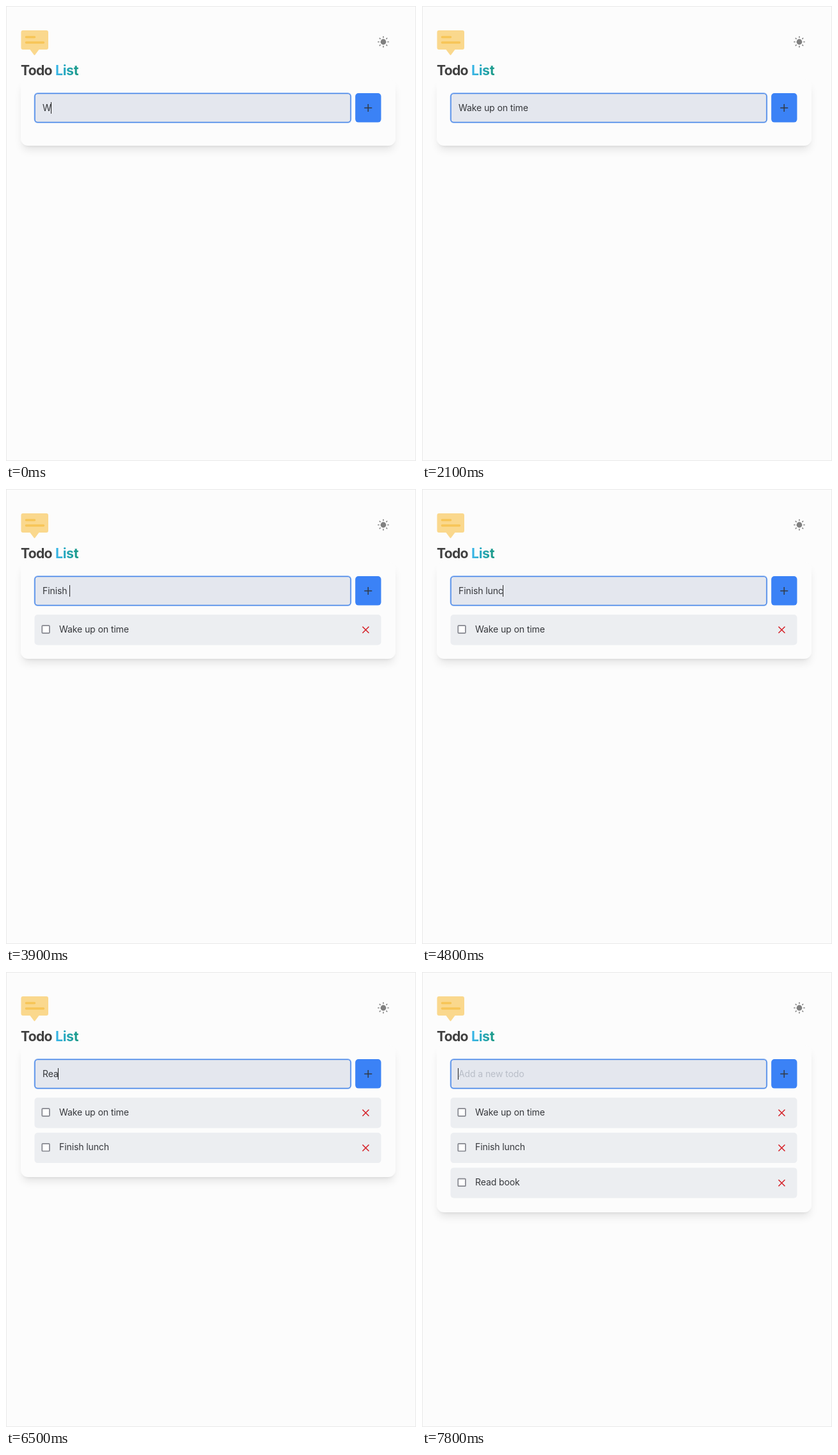
An HTML page that plays this animation: 640x710 px, repeating every 8000 ms.

```html
<!DOCTYPE html>
<html lang="en">
<head>
<meta charset="utf-8">
<title>Todo List</title>
<style>
  html, body { margin: 0; width: 100%; height: 100%; overflow: hidden; background: #fcfcfc; }
  #card {
    position: absolute; left: 23px; top: 114px; width: 584.5px;
    border-radius: 11px; background: #fcfcfc;
    box-shadow: 0 9px 14px -3px rgb(0 0 0 / .1), 0 4px 5px -4px rgb(0 0 0 / .1);
  }
  svg { position: absolute; left: 0; top: 0; }
  text { font: 14px Inter, sans-serif; letter-spacing: -.1px; white-space: pre; fill: #36383c; }
  .title { font-size: 21.2px; font-weight: 700; }
</style>
</head>
<body>
<div id="card"></div>
<svg width="640" height="710" viewBox="0 0 640 710" fill="none">
  <defs>
    <linearGradient id="listColor" gradientUnits="userSpaceOnUse" x1="78" x2="116" y1="0" y2="0">
      <stop stop-color="#38b6ea"/>
      <stop offset="1" stop-color="#14957a"/>
    </linearGradient>
  </defs>
  <rect x=".5" y=".5" width="639" height="709" stroke="#e9e9e9"/>

  <path d="M26.5 38h36.5a3 3 0 0 1 3 3v24a3 3 0 0 1-3 3h-11.5l-6 8q-1 1.3-2 0l-6-8h-11a3 3 0 0 1-3-3v-24a3 3 0 0 1 3-3z" fill="#fad88d"/>
  <path d="M31.5 48.6h13M31.5 57h27" stroke="#f7c557" stroke-width="3.5" stroke-linecap="round"/>

  <text class="title" x="23" y="108" style="letter-spacing:-.8px;fill:#404040">Todo</text>
  <text class="title" x="77" y="108" style="letter-spacing:-.3px;fill:url(#listColor)">List</text>

  <g id="sun" stroke="#808080" stroke-width="1.6" stroke-linecap="round" transform="translate(589 56)">
    <circle r="4.4" fill="#808080" stroke="none"/>
  </g>

  <rect x="43.6" y="135" width="495.8" height="48" rx="6" fill="#a9c8f8"/>
  <rect x="45.1" y="136.6" width="492.8" height="44.8" rx="4.5" fill="#e4e7ee" stroke="#4a87e6" stroke-width="1.4"/>
  <text id="input" x="57" y="164" xml:space="preserve"></text>
  <rect id="caret" y="150" width="1" height="18" fill="#222"/>

  <rect x="545.2" y="136" width="40.3" height="45.6" rx="5" fill="#3b82f6"/>
  <path d="M559.3 159h12M565.3 153v12" stroke="#333a45" stroke-width="1.5"/>

  <g id="rows"></g>
</svg>
<script>
const LOOP = 8000, ROW_PITCH = 54.7;

// One entry in keys per typed character; added is when the item joins the list.
const tasks = [
  { text: "Wake up on time", added: 2400,
    keys: [0, 100, 200, 400, 600, 800, 900, 1000, 1200, 1400, 1500, 1600, 1700, 1900, 2000] },
  { text: "Finish lunch", added: 5300,
    keys: [2900, 3100, 3300, 3500, 3600, 3800, 3900, 4200, 4400, 4600, 4800, 5000] },
  { text: "Read book", added: 7800,
    keys: [6200, 6300, 6500, 6700, 6700, 6900, 7200, 7300, 7500] },
];
const caretHidden = [[2100, 2400], [2700, 2900], [5500, 6100]];

const byId = id => document.getElementById(id);
const card = byId("card"), input = byId("input"), caret = byId("caret"), rows = byId("rows");

for (let angle = 0; angle < 360; angle += 45)
  byId("sun").insertAdjacentHTML("beforeend", `<path d="M6.9 0h1.2" transform="rotate(${angle})"/>`);

rows.innerHTML = tasks.map(({ text }, i) => `
  <g transform="translate(0 ${i * ROW_PITCH})">
    <rect x="44.5" y="196" width="541" height="47.4" rx="5" fill="#eceef1"/>
    <rect x="56.3" y="213.2" width="11.6" height="11.6" rx="1" fill="#fff" stroke="#85878f" stroke-width="1.7"/>
    <text x="83" y="223.5">${text}</text>
    <path d="M556.5 214.8l10 10m0-10l-10 10" stroke="#d61f26" stroke-width="1.5"/>
  </g>`).join("");

function render(time) {
  const count = tasks.filter(task => time >= task.added).length;
  const current = tasks[count];
  const typed = current ? current.text.slice(0, current.keys.filter(key => time >= key).length) : "";

  card.style.height = (count ? 96.6 + count * ROW_PITCH : 104) + "px";
  [...rows.children].forEach((row, i) => row.style.display = i < count ? "" : "none");

  input.textContent = typed;
  caret.setAttribute("x", Math.round(56.3 + (typed ? input.getComputedTextLength() : 0)));
  caret.style.display = caretHidden.some(([from, to]) => time >= from && time < to) ? "none" : "";
  input.textContent = typed || "Add a new todo";
  input.style.fill = typed ? "" : "#b9bec8";
}

const start = performance.now();
function tick() {
  render((performance.now() - start) % LOOP);
  requestAnimationFrame(tick);
}
tick();
</script>
</body>
</html>
```
